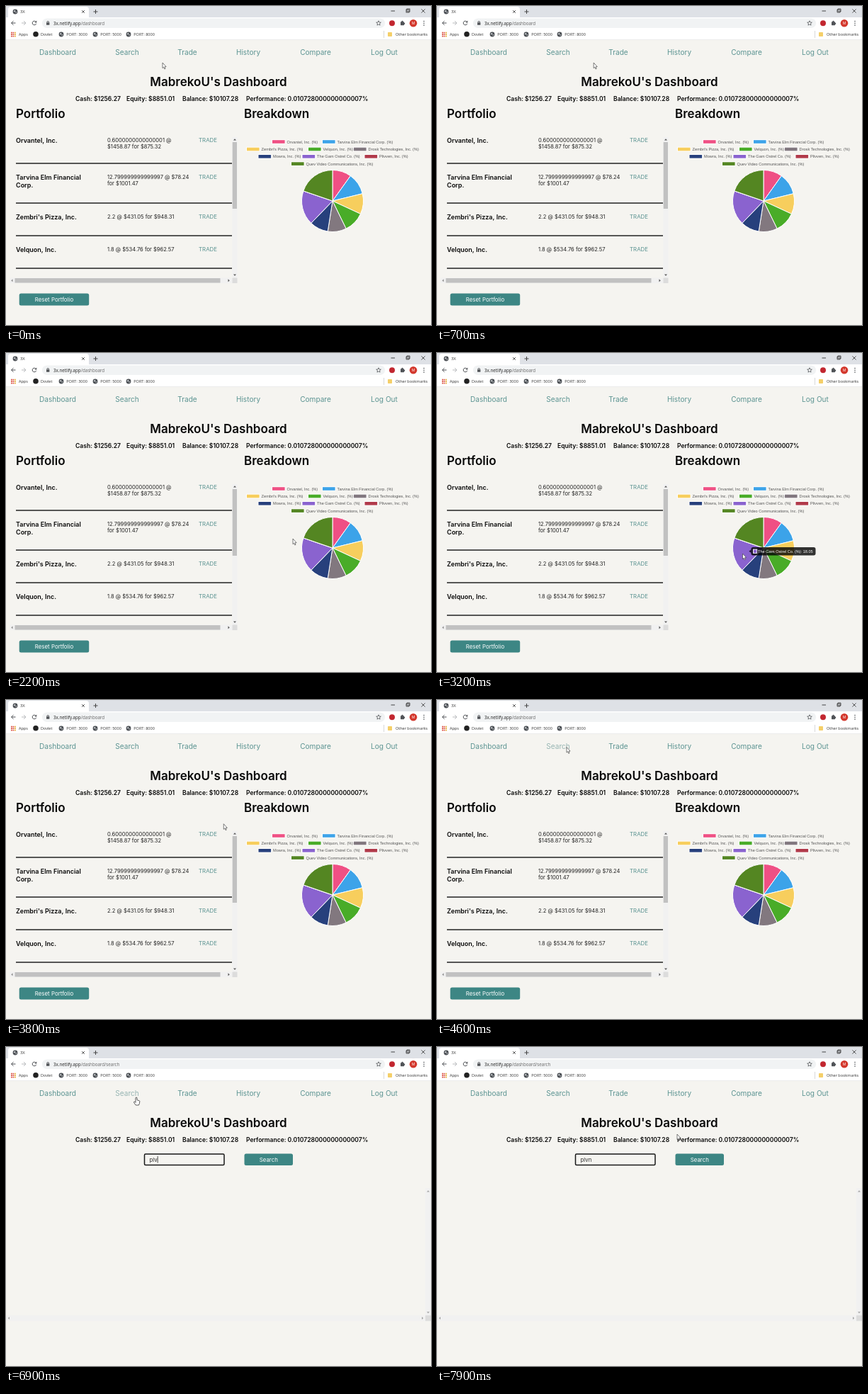
An HTML page with a canvas that plays this animation: 600x450 px, repeating every 8 s.

```html
<!DOCTYPE html>
<html lang="en">
<head>
<meta charset="utf-8">
<title>Dashboard</title>
<style>
html, body { margin: 0; width: 100%; height: 100%; overflow: hidden; background: #f5f4f0; }
canvas { display: block; width: 600px; height: 450px; }
</style>
</head>
<body>
<canvas id="stage" width="600" height="450"></canvas>
<script>
const ctx = document.getElementById('stage').getContext('2d');
const LOOP = 8000, STEP = 100, PAGE_SWITCH = 4900;
const PAGE = 'Inter, sans-serif', UI = '"Open Sans", sans-serif', CHART = '"Liberation Sans", Arial, sans-serif';
const BG = '#f5f4f0', TEAL = '#3d8684', LINK = '#5c9492', LINK_HOVER = '#97b5b3', INK = '#080808';

const nav = [['Dashboard', 73], ['Search', 171], ['Trade', 256], ['History', 342], ['Compare', 437], ['Log Out', 534]];
const stats = [['Cash: $1256.27', 98], ['Equity: $8851.01', 170], ['Balance: $10107.28', 249],
  ['Performance: 0.010728000000000007%', 339]];
const holdings = [
  { y: 190, line: 222, name: ['Orvantel, Inc.'], info: ['0.6000000000000001 @', '$1458.87 for $875.32'] },
  { y: 242, line: 278, name: ['Tarvina Elm Financial', 'Corp.'], info: ['12.799999999999997 @ $78.24', 'for $1001.47'] },
  { y: 298, line: 324, name: ["Zembri's Pizza, Inc."], info: ['2.2 @ $431.05 for $948.31'] },
  { y: 344, line: 370, name: ['Velquon, Inc.'], info: ['1.8 @ $534.76 for $962.57'] }
];
// label, colour, legend x and y, share in percent
const slices = [
  ['Orvantel, Inc.', '#ef5084', 376, 191.5, 9.89],
  ['Tarvina Elm Financial Corp.', '#3ca3e9', 447, 191.5, 11.31],
  ["Zembri's Pizza, Inc.", '#f7ce5d', 340, 202, 10.71],
  ['Velquon, Inc.', '#49ac28', 427, 202, 10.87],
  ['Drosk Technologies, Inc.', '#82787f', 491, 202, 9.7],
  ['Mowra, Inc.', '#27407c', 356.5, 212.3, 9.72],
  ['The Garn Ostrel Co.', '#8a63cf', 418.5, 212.3, 18.05],
  ['Plivven, Inc.', '#b13a4a', 506.5, 212.3, 0],
  ['Quev Video Communications, Inc.', '#548622', 403, 222.6, 19.75]
];
const pointerPath = [[0, 220.5, 80], [600, 220.5, 80], [1000, 221.5, 80], [1600, 221.5, 80], [2200, 404.5, 262],
  [2500, 404.5, 262], [3000, 431, 283], [3400, 431, 283], [4200, 182.5, 66.5], [5000, 182.5, 66.5], [5400, 184, 71],
  [7200, 184, 71], [7800, 338.5, 123], [8000, 338.5, 123]];
const ticker = 'plvn', keyTimes = [6400, 6600, 6900, 7200];

function rect(x, y, w, h, color, radius = 0) {
  ctx.fillStyle = color;
  ctx.beginPath();
  ctx.roundRect(x, y, w, h, radius);
  ctx.fill();
}
function disc(x, y, r, color) {
  ctx.fillStyle = color;
  ctx.beginPath();
  ctx.arc(x, y, r, 0, Math.PI * 2);
  ctx.fill();
}
function stroke(points, color, width = 1) {
  ctx.strokeStyle = color;
  ctx.lineWidth = width;
  ctx.beginPath();
  points.forEach(([x, y]) => ctx.lineTo(x, y));
  ctx.stroke();
}
function shape(points, fill, outline, width = 0.9) {
  ctx.beginPath();
  points.forEach(([x, y]) => ctx.lineTo(x, y));
  ctx.closePath();
  ctx.fillStyle = fill;
  ctx.fill();
  if (!outline) return;
  ctx.strokeStyle = outline;
  ctx.lineWidth = width;
  ctx.lineJoin = 'round';
  ctx.stroke();
}
// y is the middle of the capitals
function text(str, x, y, size, { color = INK, weight = 400, font = PAGE, align = 'left' } = {}) {
  ctx.font = `${weight} ${size}px ${font}`;
  ctx.textAlign = align;
  ctx.fillStyle = color;
  ctx.fillText(str, x, y + size * 0.36);
}
function triangle(x, y, angle, color) {
  ctx.save();
  ctx.translate(x, y);
  ctx.rotate(angle);
  shape([[-2, 1], [0, -1.2], [2, 1]], color);
  ctx.restore();
}

function globe(x, y) {
  disc(x, y, 3.4, '#4b4f54');
  shape([[x - 2.4, y - 1], [x, y - 2.2], [x + 0.4, y], [x - 1.2, y + 0.6]], '#c9cccf');
  shape([[x + 0.4, y + 0.6], [x + 2.4, y], [x + 1, y + 2.4]], '#c9cccf');
}

function browser(path) {
  const dark = '#505357';
  rect(0, 0, 600, 16, '#dee1e6');
  rect(3, 1, 114, 16, '#fff', [4, 4, 0, 0]);
  globe(13, 8);
  text('3X', 20, 8, 5.9, { color: '#333', font: UI });
  for (const [x, y, r] of [[109, 8, 1.9], [589, 7, 2.6]]) {
    stroke([[x - r, y - r], [x + r, y + r]], '#333', 0.8);
    stroke([[x - r, y + r], [x + r, y - r]], '#333', 0.8);
  }
  stroke([[123.5, 8], [129.5, 8]], '#444', 1);
  stroke([[126.5, 5], [126.5, 11]], '#444', 1);
  stroke([[543.5, 7], [549, 7]], '#333', 0.9);
  ctx.strokeStyle = '#333';
  ctx.lineWidth = 0.8;
  ctx.strokeRect(565, 5, 4, 4);
  ctx.strokeRect(566, 4, 4, 4);

  rect(0, 16, 600, 32, '#fff');
  for (const [x, dir, color] of [[10.5, 1, dark], [25, -1, '#b8babd']]) {
    stroke([[x - 3 * dir, 24], [x + 3 * dir, 24]], color);
    stroke([[x, 21.2], [x - 3 * dir, 24], [x, 26.8]], color);
  }
  ctx.strokeStyle = dark;
  ctx.lineWidth = 1;
  ctx.beginPath();
  ctx.arc(40, 24, 2.8, 0.3, 5.5);
  ctx.stroke();
  shape([[43.3, 20.6], [43.3, 23.6], [40.3, 23.6]], dark);
  rect(51, 17.5, 484, 13.5, '#f1f3f4', 6.7);
  rect(57, 23.2, 4.4, 3.6, dark, 0.5);
  ctx.beginPath();
  ctx.arc(59.2, 23, 1.4, Math.PI, 0);
  ctx.stroke();
  text('3x.netlify.app', 67, 24.3, 6.2, { color: '#222', font: UI });
  text(path, 67 + ctx.measureText('3x.netlify.app').width, 24.3, 6.2, { color: '#666', font: UI });

  const star = Array.from({ length: 10 }, (_, i) => {
    const r = i % 2 ? 1.5 : 3.5, a = i * Math.PI / 5;
    return [526 + r * Math.sin(a), 24.3 - r * Math.cos(a)];
  });
  shape(star, '#fff', dark, 0.8);
  disc(545, 24.3, 4, '#c22730');
  rect(557, 22.2, 5, 5, dark, 0.6);
  disc(559.5, 22, 1.2, dark);
  disc(562, 24.7, 1.2, dark);
  disc(575, 24.3, 5.3, '#d3382d');
  text('M', 575, 24.3, 5.2, { color: '#fff', font: UI, align: 'center' });
  for (const y of [21.5, 24.3, 27.1]) disc(590, y, 0.8, dark);

  const label = { color: '#333', font: UI };
  const dots = ['#d9483b', '#d9483b', '#e2a82c'];
  for (let i = 0; i < 9; i++) rect(7 + i % 3 * 2.5, 36.8 + Math.floor(i / 3) * 2.5, 1.7, 1.7, dots[i % 3]);
  text('Apps', 18, 39.7, 5.5, label);
  disc(42, 39.8, 3.8, '#222');
  text('Dovlet', 49, 39.7, 5.5, label);
  [[78, 3000], [126, 5000], [173, 8000]].forEach(([x, port]) => {
    globe(x, 40);
    text('PORT: ' + port, x + 7.3, 39.7, 5.5, label);
  });
  rect(533, 35, 0.8, 10, '#d0d0d0');
  rect(539, 37, 6, 6, '#f5cf69', 0.7);
  text('Other bookmarks', 550, 39.7, 5.5, label);
  rect(0, 47.3, 600, 0.7, '#e6e6e6');
}

function header(searchHover) {
  nav.forEach(([label, x]) => text(label, x, 65, 10.1,
    { color: label === 'Search' && searchHover ? LINK_HOVER : LINK, align: 'center' }));
  text("MabrekoU's Dashboard", 300, 106.4, 17, { weight: 600, align: 'center' });
  stats.forEach(([label, x]) => text(label, x, 130.8, 8.55, { weight: 600 }));
}

function button(label, x, y, w, h) {
  rect(x, y, w, h, TEAL, 2.5);
  text(label, x + w / 2, y + h / 2, 7.9, { color: '#fff', align: 'center' });
}

function portfolio() {
  text('Portfolio', 14, 151.7, 17, { weight: 600 });
  holdings.forEach(({ y, line, name, info }) => {
    name.forEach((s, i) => text(s, 14, y + i * 11, 9, { weight: 600 }));
    info.forEach((s, i) => text(s, 143, y - 0.8 + i * 9, 7.55, { color: '#222' }));
    text('TRADE', 272, y - 0.8, 7.9, { color: LINK });
    rect(14, line - 0.7, 305, 1.5, '#222');
  });
  rect(319.5, 185, 7, 198.5, '#f1f1f1');
  rect(319.7, 192, 6.3, 94, '#c1c1c1');
  triangle(323, 188.5, 0, '#555');
  triangle(323, 379.5, Math.PI, '#555');
  rect(5, 383.5, 314.5, 7.5, '#f1f1f1');
  rect(12.5, 384, 290, 6.5, '#c1c1c1');
  triangle(8.5, 387.3, -Math.PI / 2, '#888');
  triangle(314.5, 387.3, Math.PI / 2, '#555');
  rect(319.5, 383.5, 7, 7.5, '#dcdcdc');
  button('Reset Portfolio', 18.7, 405.5, 98.5, 17);
}

// colour box with the chart's white border
function swatch(x, y, w, h, color) {
  rect(x - 0.9, y - 0.9, w + 1.8, h + 1.8, '#fff');
  rect(x, y, w, h, color);
}

function breakdown(tooltip) {
  text('Breakdown', 336, 151.7, 17, { weight: 600 });
  const cx = 461, cy = 275;
  let angle = -Math.PI / 2;
  for (const [label, color, x, y, share] of slices) {
    swatch(x, y - 2.3, 17.6, 4.6, color);
    text(label + ' (%)', x + 20.6, y, 5.6, { color: '#555', font: CHART });
    const end = angle + share / 100 * Math.PI * 2;
    ctx.beginPath();
    ctx.moveTo(cx, cy);
    ctx.arc(cx, cy, 43.5, angle, end);
    ctx.closePath();
    ctx.fillStyle = color;
    ctx.fill();
    ctx.strokeStyle = '#fff';
    ctx.lineWidth = 1;
    ctx.lineJoin = 'bevel';
    ctx.stroke();
    angle = end;
  }
  if (!tooltip) return;
  ctx.globalAlpha = tooltip;
  shape([[440.5, 279.7], [443.5, 277.3], [443.5, 282.1]], 'rgba(0,0,0,.8)');
  rect(443.5, 274, 91, 11.5, 'rgba(0,0,0,.8)', 2.7);
  swatch(446.9, 277.5, 4.4, 4.4, slices[6][1]);
  text(slices[6][0] + ' (%): ' + slices[6][4], 453, 279.8, 5.6, { color: '#fff', font: CHART });
  ctx.globalAlpha = 1;
}

function searchPage(t) {
  const typed = ticker.slice(0, keyTimes.filter(k => t >= k).length);
  ctx.beginPath();
  ctx.roundRect(195.5, 151, 112.5, 15.5, 1.5);
  ctx.strokeStyle = '#181818';
  ctx.lineWidth = 1.5;
  ctx.stroke();
  if (typed) text(typed, 202.5, 158.7, 7.9, { color: '#333' });
  else text('TICKER', 202.5, 158.7, 7.9, { color: '#8b8b8b' });
  const blinkStart = typed ? keyTimes[typed.length - 1] : 4700;
  if ((t - blinkStart) % 1000 < 500) {
    const x = 202.5 + (typed ? ctx.measureText(typed).width : 0);
    rect(x, 154, 0.8, 9.5, '#222');
  }
  button('Search', 336.5, 150.5, 68.5, 16.5);

  rect(592, 199, 8, 180, '#f1f1f1');
  rect(0, 378.5, 592, 8, '#f1f1f1');
  rect(592, 378.5, 8, 8, '#dcdcdc');
  const faint = '#a5a5a5';
  triangle(596, 203.5, 0, faint);
  triangle(596, 374.5, Math.PI, faint);
  triangle(4, 382.5, -Math.PI / 2, faint);
  triangle(588, 382.5, Math.PI / 2, faint);
}

function pointerAt(t) {
  const i = pointerPath.findIndex(p => p[0] > t);
  const [t0, x0, y0] = pointerPath[i - 1], [t1, x1, y1] = pointerPath[i];
  const u = (t - t0) / (t1 - t0), k = u * u * (3 - 2 * u);
  return [x0 + (x1 - x0) * k, y0 + (y1 - y0) * k];
}

function drawPointer(x, y, hand) {
  ctx.save();
  ctx.translate(x, y);
  if (hand) {
    shape([[-1, 0.6], [0, 0], [1, 0.6], [1, 3.8], [4.3, 4.8], [4.8, 5.6], [4.4, 8.6], [3.4, 11],
      [-0.8, 11], [-3.4, 7.4], [-3.2, 6.2], [-2.2, 6.2], [-1, 7.4]], '#fff', '#333', 0.8);
  } else {
    shape([[0.5, 0], [0.5, 7.6], [2.1, 6.2], [3.3, 8.9], [4.5, 8.4], [3.4, 5.8], [5.6, 5.6]], '#fff', '#444', 0.7);
  }
  ctx.restore();
}

function draw(t) {
  const [x, y] = pointerAt(t);
  const overSearch = t > 4000 && x > 155 && x < 188 && y < 73;
  const onSearchPage = t >= PAGE_SWITCH;
  rect(0, 0, 600, 450, BG);
  browser(onSearchPage ? '/dashboard/search' : '/dashboard');
  header(overSearch);
  if (onSearchPage) {
    searchPage(t);
  } else {
    portfolio();
    const fadeIn = (t - 2700) / 200, fadeOut = (3700 - t) / 200;
    breakdown(Math.max(0, Math.min(1, fadeIn, fadeOut)));
  }
  drawPointer(x, y, overSearch && t >= 4700);
}

function frame(now) {
  draw(Math.floor(now % LOOP / STEP) * STEP);
  requestAnimationFrame(frame);
}
requestAnimationFrame(frame);
</script>
</body>
</html>
```
